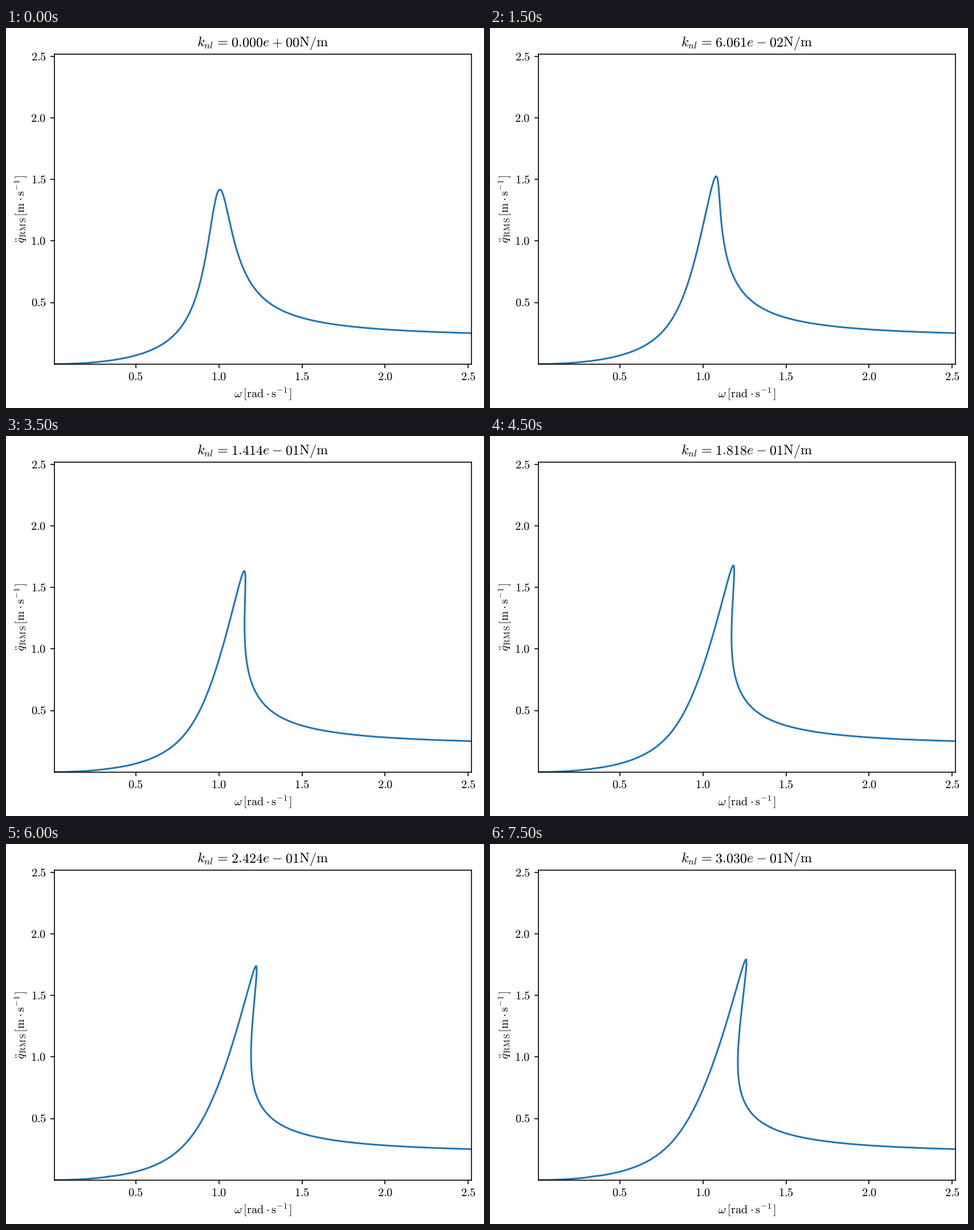
Write a matplotlib script that moves like this. It is 839 by 668 pixels and loops after 8000 ms.

```python
import numpy as np
import matplotlib.pyplot as plt
from matplotlib.animation import FuncAnimation

W, H, DPI = 839, 668, 128
S = 147.6 / DPI                      # keeps default point sizes at 147.6 px per inch
LEFT, RIGHT, TOP, BOTTOM = 85, 817, 45.6, 590.7

FRAMES, INTERVAL = 16, 500
STIFFNESS = np.arange(FRAMES) * 2 / 99
DAMPING, FORCE = 0.15, 0.3

plt.rcParams.update({
    "mathtext.fontset": "cm",
    "font.family": "Liberation Serif",   # line height close to Computer Modern
    "text.hinting": "no_hinting",
    "axes.linewidth": 0.8 * S,
    "xtick.major.width": 0.8 * S, "ytick.major.width": 0.8 * S,
    "xtick.major.size": 3.5 * S, "ytick.major.size": 3.5 * S,
    "xtick.major.pad": 3.5 * S, "ytick.major.pad": 3.5 * S,
    "xtick.labelsize": 10 * S, "ytick.labelsize": 10 * S,
})

# Harmonic balance of q'' + c q' + q + k q^3 = F cos(wt + phase).
# The phase of the first harmonic parametrises the curve, so folds need no special care.
ORDERS = np.array([1, 3, 5])
theta = np.arange(64) * 2 * np.pi / 64
basis = np.array([f(h * theta) for h in ORDERS for f in (np.cos, np.sin)])
project = basis.T * 2 / len(theta)

s = np.linspace(0.01, 2.55, 1200)
phase = np.arctan2(DAMPING * s, 1 - s**2)
load = np.zeros((len(s), 6))
load[:, 0] = FORCE * np.cos(phase)
load[:, 1] = -FORCE * np.sin(phase)


def newton_step(x, w, k):
    """Column 1 of x (sine of the first harmonic) stays zero; w takes its slot."""
    q = x @ basis
    res = k * q**3 @ project - load
    jac = 3 * k * np.einsum("nt,ti,jt->nij", q**2, project, basis, optimize=True)
    dw = np.zeros_like(x)
    for i, h in enumerate(ORDERS):
        a, b = 2 * i, 2 * i + 1
        stiff, damp = 1 - (h * w)**2, DAMPING * h * w
        res[:, a] += stiff * x[:, a] + damp * x[:, b]
        res[:, b] += stiff * x[:, b] - damp * x[:, a]
        jac[:, a, a] += stiff
        jac[:, b, b] += stiff
        jac[:, a, b] += damp
        jac[:, b, a] -= damp
        dw[:, a] = -2 * h**2 * w * x[:, a] + DAMPING * h * x[:, b]
        dw[:, b] = -2 * h**2 * w * x[:, b] - DAMPING * h * x[:, a]
    jac[:, :, 1] = dw
    step = np.linalg.solve(jac, res[:, :, None])[:, :, 0]
    w = w - step[:, 1]
    step[:, 1] = 0
    return x - step, w


def response_curves():
    x = np.zeros((len(s), 6))
    x[:, 0] = FORCE / np.hypot(1 - s**2, DAMPING * s)
    w = s.copy()
    gain = np.repeat(ORDERS, 2)**4
    curves = []
    for k in STIFFNESS:
        for _ in range(5):
            x, w = newton_step(x, w, k)
        curves.append((w, w**2 * np.sqrt((gain * x**2).sum(axis=1) / 2)))
    return curves


curves = response_curves()

fig = plt.figure(figsize=(W / DPI, H / DPI), dpi=DPI, facecolor="white")
ax = fig.add_axes([LEFT / W, 1 - BOTTOM / H, (RIGHT - LEFT) / W, (BOTTOM - TOP) / H])
ax.set(xlim=(0.01, 2.52), ylim=(0, 2.521))
ticks = np.arange(1, 6) / 2
labels = [f"${t:.1f}$" for t in ticks]
ax.set_xticks(ticks, labels)
ax.set_yticks(ticks, labels)
line, = ax.plot([], [], color="#1f77b4", lw=1.5 * S)


def gap(em):
    return rf"\hspace{{{em}}}"


def label(x, y, text, size, **kw):
    return fig.text(x / W, 1 - y / H, text, fontsize=size * S, va="baseline", **kw)


# The gaps restore TeX's spacing around operators and its wider script letters.
DOT = gap(0.022) + r"\cdot" + gap(0.022)
PER_S = r"s^{-" + gap(0.07) + "1" + gap(0.07) + "}"
RMS = r"\mathrm{R" + gap(0.1) + "M" + gap(0.1) + "S" + gap(0.15) + "}"

label(399.5, 648.7, rf"$\omega{gap(0.22)}[\mathrm{{rad{DOT}{PER_S}}}]$", 10)
label(32.3, 377.5, rf"$\ddot{{q}}_{{{RMS}}}[\mathrm{{m{DOT}{PER_S}}}]$", 10,
      rotation=90, rotation_mode="anchor")
title = label(451, 32.9, "", 11.75, ha="center")


def update(i):
    line.set_data(*curves[i])
    mantissa, exponent = f"{STIFFNESS[i]:.3e}".split("e")
    power = gap(0.04) + exponent[0] + gap(0.04) + exponent[1:]
    title.set_text(rf"$k_{{nl}}{gap(0.12)}={gap(0.078)}{mantissa}e{power}\mathrm{{N/m}}$")
    return line, title


anim = FuncAnimation(fig, update, frames=FRAMES, interval=INTERVAL,
                     repeat=True, repeat_delay=0, blit=False)
plt.show()
```
